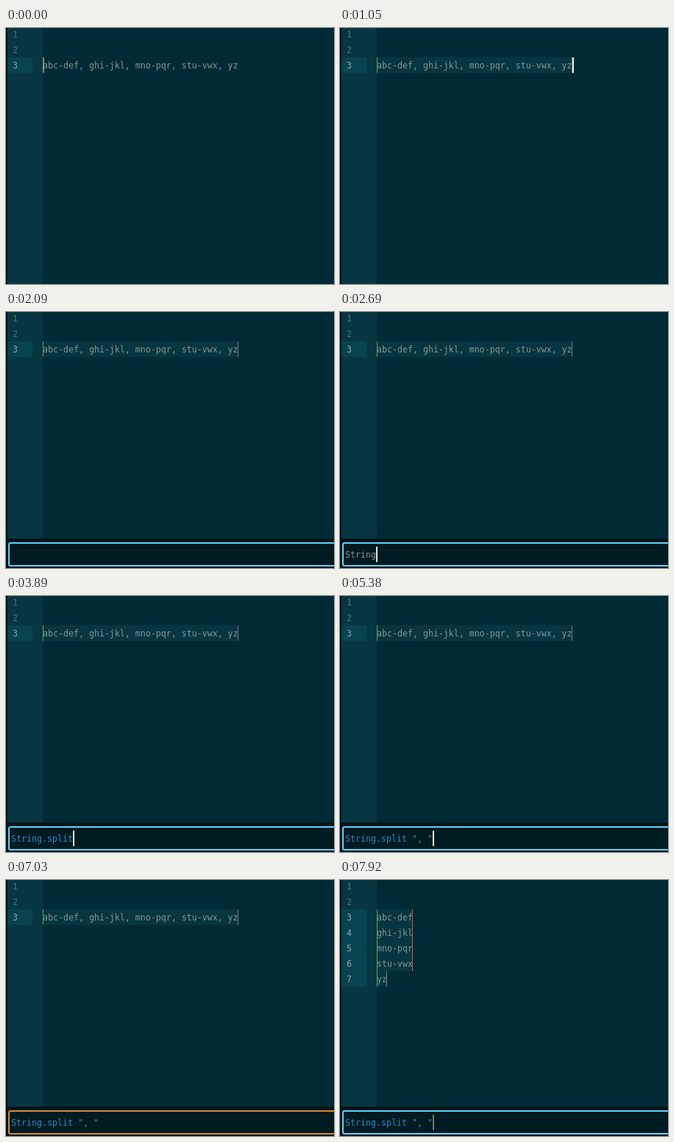
These frames come from a looping animation (446x348 px, 8 s). An HTML page with a canvas:

```html
<!DOCTYPE html>
<html lang="en">
<head>
<meta charset="utf-8">
<title>Editor: split selection</title>
<style>
  html, body { margin: 0; width: 100%; height: 100%; overflow: hidden; background: #002b36; }
  canvas { display: block; }
</style>
</head>
<body>
<canvas id="stage" width="446" height="348"></canvas>
<script>
const ctx = document.getElementById('stage').getContext('2d');

const LOOP = 8000, CHAR = 7, ROW = 21, TEXT_X = 50, PROMPT_X = 7, PROMPT_Y = 319;
const SELECT = 1050, OPEN = 1350, BLUR = 1490, HIGHLIGHT = 3890;
const RUN = 6700, RESULT = 7600, FADE = 300;
const BLINK_DELAY = 570, BLINK_PERIOD = 720;

const SOURCE = 'abc-def, ghi-jkl, mno-pqr, stu-vwx, yz';
const COMMAND = 'String.split ", "';
const NAME_LENGTH = 12;

// [time, number of command characters typed so far]
const KEYS = [
  [2540, 3], [2690, 6], [3290, 7], [3440, 9], [3590, 10], [3890, 12],
  [4040, 13], [4790, 14], [4930, 15], [5230, 16], [5380, 17]
];

const COLOR = {
  back: '#002b36', gutter: '#073642', activeGutter: '#084350', edge: '#00141a',
  number: '#586e75', activeNumber: '#93a1a1', text: '#839496',
  panel: '#00151b', input: '#001b21', name: '#268bd2', string: '#2aa198',
  start: '#5f9f68', end: '#c25a3c', mainEnd: '#66807f', caret: '#eee8d5'
};
const CYAN = [92, 212, 250], ORANGE = [214, 138, 56];

function box(x, y, w, h, color) {
  ctx.fillStyle = color;
  ctx.fillRect(x, y, w, h);
}

function write(text, x, top, color) {
  ctx.fillStyle = color;
  ctx.fillText(text, x, top + 15);
}

function caret(x, y, opacity) {
  ctx.globalAlpha = opacity;
  box(x, y, 2, ROW, COLOR.caret);
  ctx.globalAlpha = 1;
}

const rowTop = index => 40 + ROW * (index - 2);
const wave = t => 0.5 + 0.5 * Math.cos(2 * Math.PI * t / BLINK_PERIOD);
const clamp = v => Math.max(0, Math.min(1, v));

function mix(a, b, k) {
  return `rgb(${a.map((v, i) => Math.round(v + (b[i] - v) * k))})`;
}

function drawEditor(t) {
  const rows = ['', '', ...(t < RESULT ? [SOURCE] : SOURCE.split(', '))];
  box(0, 0, 446, 348, COLOR.back);
  box(2, 0, 48, 348, COLOR.gutter);
  box(0, 0, 2, 348, COLOR.edge);

  rows.forEach((text, i) => {
    const y = rowTop(i), active = i >= 2, width = text.length * CHAR;
    if (active) box(2, y, 34, ROW, COLOR.activeGutter);
    write(i + 1, 9, y, active ? COLOR.activeNumber : COLOR.number);
    if (!active) return;

    const selected = t >= SELECT;
    if (selected) box(TEXT_X, y, width, ROW, COLOR.gutter);
    write(text, TEXT_X, y, COLOR.text);
    if (selected) {
      const isMain = i === rows.length - 1;
      box(TEXT_X, y, 1, ROW, COLOR.start);
      box(TEXT_X + width - 1, y, 1, ROW, isMain ? COLOR.mainEnd : COLOR.end);
    }
  });

  if (t < SELECT) caret(TEXT_X, rowTop(2), wave(t + BLINK_PERIOD / 4));
  else if (t < BLUR) caret(TEXT_X + SOURCE.length * CHAR, rowTop(2), 1);
}

function drawPrompt(t) {
  box(0, 308, 446, 40, COLOR.panel);
  ctx.beginPath();
  ctx.roundRect(4, 314, 460, 31, 2);
  ctx.fillStyle = COLOR.input;
  ctx.fill();
  const busy = clamp((t - RUN) / FADE) - clamp((t - RESULT) / FADE);
  ctx.strokeStyle = mix(CYAN, ORANGE, busy);
  ctx.lineWidth = 2;
  ctx.stroke();

  const key = KEYS.filter(([time]) => time <= t).pop();
  const count = key ? key[1] : 0;
  const typed = COMMAND.slice(0, count);
  write(typed.slice(0, NAME_LENGTH), PROMPT_X, PROMPT_Y, t < HIGHLIGHT ? COLOR.text : COLOR.name);
  write(typed.slice(NAME_LENGTH + 1), PROMPT_X + (NAME_LENGTH + 1) * CHAR, PROMPT_Y, COLOR.string);

  const opacity = key
    ? wave(Math.max(0, t - key[0] - BLINK_DELAY))
    : wave(t - OPEN + BLINK_PERIOD / 2);
  caret(PROMPT_X + count * CHAR, PROMPT_Y, opacity);
}

function frame(now) {
  const t = now % LOOP;
  ctx.font = '11.627px "DejaVu Sans Mono", monospace';
  drawEditor(t);
  if (t >= OPEN) drawPrompt(t);
}

const origin = performance.now();
function tick() {
  frame(performance.now() - origin);
  requestAnimationFrame(tick);
}
tick();
</script>
</body>
</html>
```
